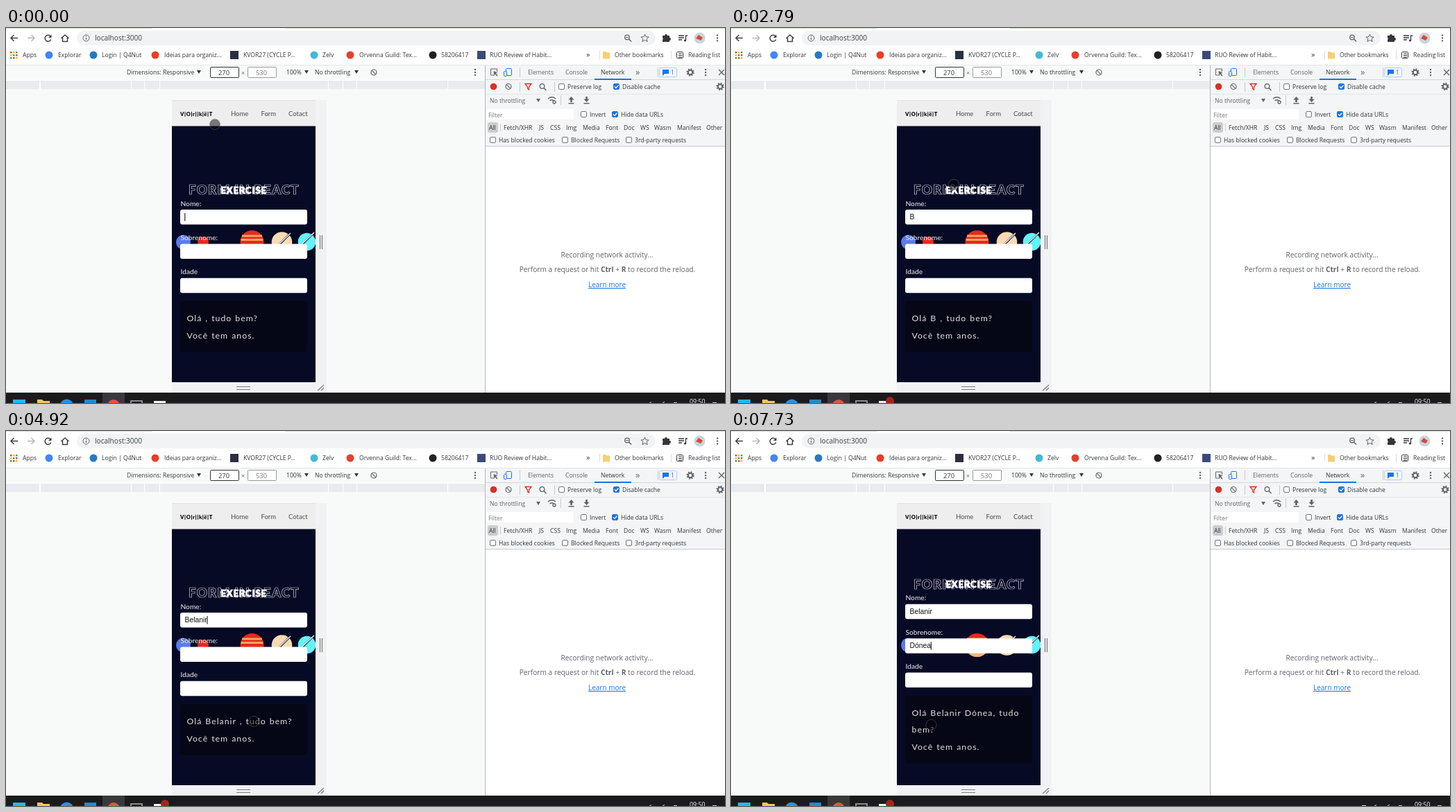
Write an HTML page that moves like this. It is 1036 px wide and 541 px high and loops after 8 s.

```html
<!DOCTYPE html>
<html lang="pt">
<head>
<meta charset="utf-8">
<style>
  html, body { margin: 0; width: 100%; height: 100%; overflow: hidden; background: #fff; }
  svg { display: block; font-family: "Open Sans", "Noto Sans", sans-serif; }
  .page { font-family: Lato, "Open Sans", sans-serif; }
  .field { font: 10.35px "Liberation Sans", Arial, sans-serif; fill: #111; }
  .talk { font-size: 12.3px; letter-spacing: 1px; word-spacing: .9px; fill: #e6e2e0; }
</style>
</head>
<body>
<svg id="stage" width="1036" height="541" viewBox="0 0 1036 541"></svg>
<script>
const GREY = '#5f6368', DARK = '#33363a', BLUE = '#1a73e8', NAVY = '#070a25';
const rect = (x, y, w, h, fill, more = '') =>
  `<rect x="${x}" y="${y}" width="${w}" height="${h}" fill="${fill}" ${more}/>`;
const dot = (x, y, r, fill, more = '') =>
  `<circle cx="${x}" cy="${y}" r="${r}" fill="${fill}" ${more}/>`;
const line = (d, color = GREY, width = 1, more = '') =>
  `<path d="${d}" fill="none" stroke="${color}" stroke-width="${width}" ${more}/>`;
const shape = (d, fill = GREY, more = '') => `<path d="${d}" fill="${fill}" ${more}/>`;
const text = (x, y, s, size = 8.6, fill = DARK, more = '') =>
  `<text x="${x}" y="${y}" font-size="${size}" fill="${fill}" ${more}>${s}</text>`;
const box = (x, y, w, h, fill, stroke, r = 1) =>
  rect(x + .5, y + .5, w - 1, h - 1, fill, `stroke="${stroke}" rx="${r}"`);
const caretDown = (x, y, c = DARK) => shape(`M${x} ${y}h6l-3 5z`, c);
const kebab = (x, y, c = GREY) => [-4, 0, 4].map(d => dot(x, y + d, 1.2, c)).join('');
const check = (x, y, label, on) =>
  box(x, y, 9, 9, on ? BLUE : '#fff', on ? BLUE : '#767676', 1.5) +
  (on ? line(`M${x + 2} ${y + 4.5}l2 2 3.5-4`, '#fff', 1.3) : '') + text(x + 13, y + 7.5, label);
const gear = (x, y) => dot(x, y, 3.2, 'none', `stroke="${GREY}" stroke-width="2"`) +
  dot(x, y, 4.8, 'none', `stroke="${GREY}" stroke-width="1.8" stroke-dasharray="1.9 1.87"`);
const lens = (x, y) => dot(x, y, 3.3, 'none', `stroke="${GREY}" stroke-width="1.3"`) +
  line(`M${x + 2.5} ${y + 2.5}l3.5 3.5`, GREY, 1.5);
const noEntry = (x, y) => dot(x, y, 4, 'none', `stroke="${GREY}" stroke-width="1.2"`) +
  line(`M${x - 2.8} ${y - 2.8}l5.6 5.6`, GREY, 1.2);

function browserBar() {
  const icons = [[62, 'd', '#4285f4'], [126, 'd', '#2779c4'], [215, 'd', '#ee3c24'], [329, 's', '#2b2f3f'],
    [444, 'd', '#43b9d8'], [496, 'd', '#e4402f'], [615, 'd', '#202124'], [685, 's', '#3b4a78']];
  const labels = [[24, 'Apps'], [75, 'Explorar'], [138, 'Login | Q4Nut'], [228, 'Ideias para organiz...'],
    [342, 'KVOR27 (CYCLE P...'], [456, 'Zelv'], [509, 'Orvenna Guild: Tex...'], [627, '58206417'],
    [697, 'RUO Review of Habit...'], [877, 'Other bookmarks'], [983, 'Reading list']];
  let s = rect(0, 0, 1036, 54, '#fff') + rect(0, 0, 210, 1, '#cfe5c6') + rect(402, 0, 634, 1, '#cfe5c6');
  s += line('M17 14.5H7M11.5 10l-4.5 4.5 4.5 4.5', '#3c4043', 1.5);
  s += line('M31 14.5h10M36.500 10l4.500 4.500-4.500 4.500', '#b4b7ba', 1.5);
  s += line('M64.500 12.500a4.500 4.500 0 1 0 .3 4', '#3c4043', 1.5) + shape('M65.500 9.500v4.500h-4.500z', '#3c4043');
  s += line('M79.500 15l5.500-5 5.500 5M81.500 14v5.500h7V14', '#3c4043', 1.5);
  s += rect(102, 4, 834, 21, '#f1f3f4', 'rx="10.5"');
  s += dot(115.5, 14.5, 4.5, 'none', `stroke="${GREY}"`) + line('M115.500 14v3M115.500 11.500v1.200', GREY, 1.2);
  s += text(128, 18, 'localhost:3000', 10.1, '#3c4043');
  s += lens(895, 13.5) + line('M893 13.500h4') +
    line('M920.500 9l1.600 3.700 4 .3-3 2.600 1 4-3.600-2.200-3.600 2.200 1-4-3-2.600 4-.3z');
  s += shape('M946 11h3a2 2 0 0 1 4 0h3v3a2 2 0 0 1 0 4v2h-10v-3a2 2 0 0 0 0-3z', DARK);
  s += line('M969 11h8M969 14h8M969 17h5M979.500 18v-7h2.500', DARK, 1.3) + dot(978.5, 18, 1.6, DARK);
  s += dot(999.5, 14.5, 8, '#cbd3dc') + shape('M994 15l4-5 6 4-3 4z', '#d8483d') + kebab(1025, 14.5);
  for (let i = 0; i < 9; i++)
    s += rect(6 + i % 3 * 4, 34 + (i / 3 | 0) * 4, 2.5, 2.5, ['#ea4335', '#fbbc04', '#34a853'][(i + (i / 3 | 0)) % 3]);
  for (const [x, kind, color] of icons)
    s += kind === 'd' ? dot(x, 39, 5.5, color) : rect(x - 6, 33, 12, 12, color);
  for (const [x, label] of labels) s += text(x, 42, label);
  s += text(836, 42, '»', 11) + shape('M860 34h4l1.500 1.500h4.500v9h-10z', '#f6cf74');
  s += line('M855.500 33v12', '#dadce0') + line('M958.500 33v12', '#dadce0');
  return s + box(966, 34, 10, 10, '#fff', DARK) + line('M969 37h5M969 39.500h5M969 42h5', DARK);
}

function deviceArea() {
  let s = rect(0, 54, 690, 472, '#f8faf9') + rect(0, 53, 1036, 1, '#e3e5e6') + rect(0, 75, 690, 13, '#fff');
  s += text(174, 67, 'Dimensions: Responsive') + caretDown(275, 61);
  s += box(294, 56, 42, 16, '#fff', '#333') + text(306, 67.5, '270', 9.4) + text(339, 68, '×', 9, GREY);
  s += box(348, 56, 42, 16, '#fff', '#999') + text(360, 67.5, '530', 9.4, '#777');
  s += text(404, 67, '100%') + caretDown(430, 61) + text(445, 67, 'No throttling') + caretDown(502, 61);
  s += noEntry(530, 64) + kebab(676, 64);
  const cuts = [0, 49, 180, 199, 221, 464, 485, 505, 636, 690];
  cuts.slice(1).forEach((end, i) => s += rect(cuts[i] + (i ? 1 : 0), 76, end - cuts[i] - 1, 12, '#e9ebef'));
  s += rect(446, 104, 16, 422, '#f0f2f4') + rect(239, 511, 223, 15, '#f0f2f4');
  s += line('M452.500 299v20M455.500 299v20M332 517.500h20M332 521.500h20', '#777a7e', 1.2);
  s += line('M449 523l9-8M454 523l4-4', '#777a7e', 1.2);
  return s;
}

function devtools() {
  let s = rect(690, 54, 346, 472, '#fff') + rect(691, 54, 345, 116, '#f3f5f6') + rect(690, 54, 1, 472, '#b5b8bc');
  s += rect(691, 74, 345, 1, '#d3d6d9') + rect(691, 95, 345, 1, '#e4e6e8') + rect(691, 170, 345, 1, '#c8cbcf');
  s += line('M704 68h-5.500v-9h9v4') + shape('M702.500 62l6 2.500-2.600 1 2.600 3-1.300 1-2.400-3-1.500 2z');
  s += box(720, 58, 9, 11, 'none', BLUE) + box(717, 62, 5, 8, '#f3f5f6', BLUE);
  s += line('M740.500 57v14', '#c9ccd0') + line('M939.500 57v14', '#c9ccd0');
  s += text(752, 67, 'Elements', 8.6, GREY) + text(806, 67, 'Console', 8.6, GREY) + text(857, 67, 'Network');
  s += rect(848, 73, 53, 2, BLUE) + text(907, 68, '»', 13, GREY);
  s += box(941, 57, 26, 14, '#f3f7fe', '#aecbfa', 2) + shape('M946 60h9v6h-6l-3 3z', BLUE) + text(958, 67, '1', 8.6, BLUE);
  s += gear(986, 64) + kebab(1008, 64) + line('M1027 60l8 8M1035 60l-8 8', GREY, 1.3);
  s += dot(702.5, 84.5, 4.8, '#d93025') + noEntry(724, 84.5) + line('M740.500 78v14M790.500 78v14', '#c9ccd0');
  s += line('M748 80.500h9l-3.500 4.500v4l-2-1.500v-2.500z', '#d93025', 1.3) + lens(772.5, 84);
  s += check(796, 80, 'Preserve log') + check(875, 80, 'Disable cache', true) + gear(1029, 84.5);
  s += text(697, 108, 'No throttling', 8.6, GREY) + caretDown(764, 102, GREY);
  s += line('M781 102q5.500-4.500 11 0M783.500 105q3-2.500 6 0', GREY, 1.4) + dot(790, 107, 2, 'none', `stroke="${GREY}" stroke-width="1.3"`);
  s += line('M799.500 97v14', '#c9ccd0');
  s += shape('M814.500 99l4 4.500h-2.700v3.500h-2.600v-3.500h-2.700zM810.500 108h8v1.400h-8z');
  s += shape('M836.500 107l4-4.500h-2.700V99h-2.600v3.500h-2.700zM832.500 108h8v1.400h-8z');
  s += rect(692, 117, 126, 15, '#fff') + text(695, 129, 'Filter', 8.8, '#777');
  s += check(828, 120, 'Invert') + check(873, 120, 'Hide data URLs', true);
  s += rect(694, 136, 15, 15, '#cbced1', 'rx="3"') + line('M712.500 138v11', '#c9ccd0');
  const types = { 696: 'All', 717: 'Fetch/XHR', 768: 'JS', 784: 'CSS', 807: 'Img', 831: 'Media', 864: 'Font',
    890: 'Doc', 914: 'WS', 934: 'Wasm', 967: 'Manifest', 1009: 'Other' };
  for (const x in types) s += text(x, 147, types[x]);
  s += check(697, 157, 'Has blocked cookies') + check(801, 157, 'Blocked Requests') + check(893, 157, '3rd-party requests');
  const mid = 'text-anchor="middle"';
  s += text(866, 331, 'Recording network activity…', 10.2, GREY, mid);
  s += text(866.5, 352, 'Perform a request or hit <tspan font-weight="700">Ctrl</tspan> + <tspan font-weight="700">R</tspan> to record the reload.', 10.2, GREY, mid);
  return s + text(866, 374, 'Learn more', 10, BLUE, mid + ' text-decoration="underline"');
}

function phone() {
  let s = rect(239, 104, 207, 407, NAVY) + rect(239, 104, 207, 37.5, '#eee') + rect(239, 104, 207, 1, '#e2e2e2');
  s += text(251, 126.5, 'V|O|r||k|ë|T', 7.6, '#000', 'font-weight="900" letter-spacing=".6"');
  s += text(324, 126.5, 'Home', 9.5, '#4a4a4a') + text(367.5, 126.5, 'Form', 9.5, '#4a4a4a') + text(407, 126.5, 'Cotact', 9.5, '#4a4a4a');
  s += dot(255.5, 309, 10.5, '#5b7bea') + dot(284, 309, 8, '#e8281c');
  s += dot(354.5, 309, 17, '#e8281c') + rect(340, 298.5, 29, 3, '#f0a55f') + rect(338.500, 304, 32, 3, '#f0a55f');
  s += shape('M341.500 320h26a17 17 0 0 1-26 0z', '#f0b57e');
  s += dot(397.5, 309, 14.8, '#fbdab3') + line('M388 318l22-22', NAVY, 2.6) + line('M388 317l22-21', '#fff', 1.3);
  s += `<g clip-path="url(#screen)">${dot(433.5, 308.5, 12.8, '#62f2f8')}</g>`;
  s += line('M426 313l18-18', NAVY, 2.4) + line('M426 312l18-17', '#fff', 1.3);

  let form = text(343, 240, 'FORM IN REACT', 18.6, 'none',
    'font-weight="900" letter-spacing="1.25" text-anchor="middle" stroke="#d6d6de" stroke-width=".7"');
  form += text(342.5, 238.500, 'EXERCISE', 13.2, '#fff',
    'font-weight="900" letter-spacing=".8" text-anchor="middle" stroke="#fff" stroke-width=".8"');
  ['Nome:', 'Sobrenome:', 'Idade'].forEach((label, i) => {
    form += text(251.5, 256.5 + i * 49.4, label, 10.2, '#f2f2f2') + rect(251, 262 + i * 49.4, 183, 21.5, '#fff', 'rx="3"');
  });
  form += '<text id="first" class="field" x="257.5" y="276"/><text id="last" class="field" x="257.5" y="325.4"/>';
  form += rect(257.3, 267, 1, 11.5, '#000', 'id="caret"') + rect(251, 394, 183, 73.5, '#050717', 'id="card" rx="4"');
  form += ['hello', 'rest', 'age'].map(id => `<text id="${id}" class="talk" x="260.5"/>`).join('');
  return `<g class="page">${s}<g id="form">${form}</g></g>`;
}

function taskbar() {
  let s = rect(0, 526, 1036, 15, '#1b1b1e') + rect(139, 526, 32, 15, '#39393d');
  s += rect(10, 536, 18, 5, '#22b8ee') + shape('M45 536h7l2 2h9v3H45z', '#f5c65b');
  s += dot(87.5, 545, 9.500, '#2f8fd8') + rect(113, 536, 17, 5, '#2489ca') + dot(155, 545, 9, '#e2553f');
  s += rect(179, 537, 18, 4, '#8b8d90') + rect(181, 539, 14, 2, '#1b1b1e') + rect(213, 538, 17, 3, '#f1f1f1');
  s += line('M927 541l3-1.500M946 541l3-2M962 540.500h5M1018 540.500h6', '#ccc');
  s += text(985, 542, '09:50', 8.8, '#fff');
  return s + dot(229, 538, 6, '#a5231d', 'id="badge"') + rect(909, 540, 6, 1, '#ddd', 'id="tray"');
}

const cursors =
  dot(0, 0, 7.6, 'rgba(0,0,0,.5)', 'id="ring" stroke="rgba(115,115,120,.45)"') +
  shape('M0 0v12.500l2.900-2.700 1.900 4.400 2-.9-1.900-4.200h4z', '#fff', 'id="arrow" stroke="#222" stroke-width=".9"') +
  shape('M-8.500 0l4-3.700v2.500h9v-2.500l4 3.700-4 3.700v-2.500h-9v2.500z', '#fff', 'id="resize" stroke="#222" stroke-width=".9"');

stage.innerHTML = '<clipPath id="screen"><path d="M239 104h207v407h-207z"/></clipPath>' +
  browserBar() + deviceArea() + phone() + devtools() + taskbar() + cursors;
const el = id => document.getElementById(id);

const LOOP = 8000;
const FIRST = 'Belanir', FIRST_KEYS = [2240, 2860, 3060, 3180, 3290, 3410, 3520];
const LAST = 'Dónea', LAST_KEYS = [6730, 7260, 7390, 7540, 7730];
const BLINKS = [300, 830, 1360, 1890, 2790, 2860, 4120, 4590, 5670, 6200];
const FOCUS_LAST = 5140;
// time, x, y, cursor (ring unless named)
const POINTER = [[0, 301, 139], [820, 285, 125], [890, 260, 106, 'arrow'], [1010, 247, 101, 'arrow'],
  [1080, 262, 150], [1150, 287, 235], [1290, 297, 240], [1360, 305, 236], [1430, 312, 232], [1560, 318, 228],
  [1630, 321, 226], [4120, 280, 330], [4220, 240, 425], [4320, 229.5, 446, 'resize'], [4480, 231, 380, 'resize'],
  [4540, 248, 240], [4610, 262, 114], [4680, 290, 180], [4750, 325, 290], [4820, 347, 370], [4920, 357, 419],
  [4990, 352, 460], [5060, 340, 508], [5200, 345, 455], [5260, 346, 437], [5330, 325, 428], [5390, 300, 420],
  [5450, 288.5, 424]];
const passed = (times, t) => times.filter(k => k <= t).length;
const move = (node, x, y) => node.setAttribute('transform', `translate(${x} ${y})`);
const show = (node, on) => node.setAttribute('visibility', on ? 'visible' : 'hidden');
const put = (id, s, y) => { el(id).textContent = s; if (y) el(id).setAttribute('y', y); };

function draw(t) {
  const first = FIRST.slice(0, passed(FIRST_KEYS, t)), last = LAST.slice(0, passed(LAST_KEYS, t));
  const wrapped = last.length > 1, extra = wrapped ? 24.5 : 0;
  put('first', first);
  put('last', last);
  put('hello', `Olá ${first} ${last}, tudo` + (wrapped ? '' : ' bem?'), 423);
  put('rest', wrapped ? 'bem?' : '', 447.5);
  put('age', 'Você tem anos.', 447.5 + extra);
  el('card').setAttribute('height', 73.5 + extra);
  move(el('form'), 0, -extra / 2);

  const onLast = t >= FOCUS_LAST;
  move(el('caret'), el(onLast ? 'last' : 'first').getComputedTextLength(), onLast ? 49.4 : 0);
  show(el('caret'), passed(BLINKS, t) % 2 === 0);

  const [, x, y, kind = 'ring'] = POINTER[passed(POINTER.map(p => p[0]), t) - 1];
  for (const id of ['ring', 'arrow', 'resize']) {
    show(el(id), id === kind);
    move(el(id), x, y);
  }
  const rise = Math.min(4, Math.floor((t - 70) / 70));
  show(el('badge'), t >= 70);
  move(el('badge'), 0, 8 - rise * 2);
  show(el('tray'), t >= 7000);
}

function tick() {
  draw(performance.now() % LOOP);
  requestAnimationFrame(tick);
}
tick();
</script>
</body>
</html>
```
